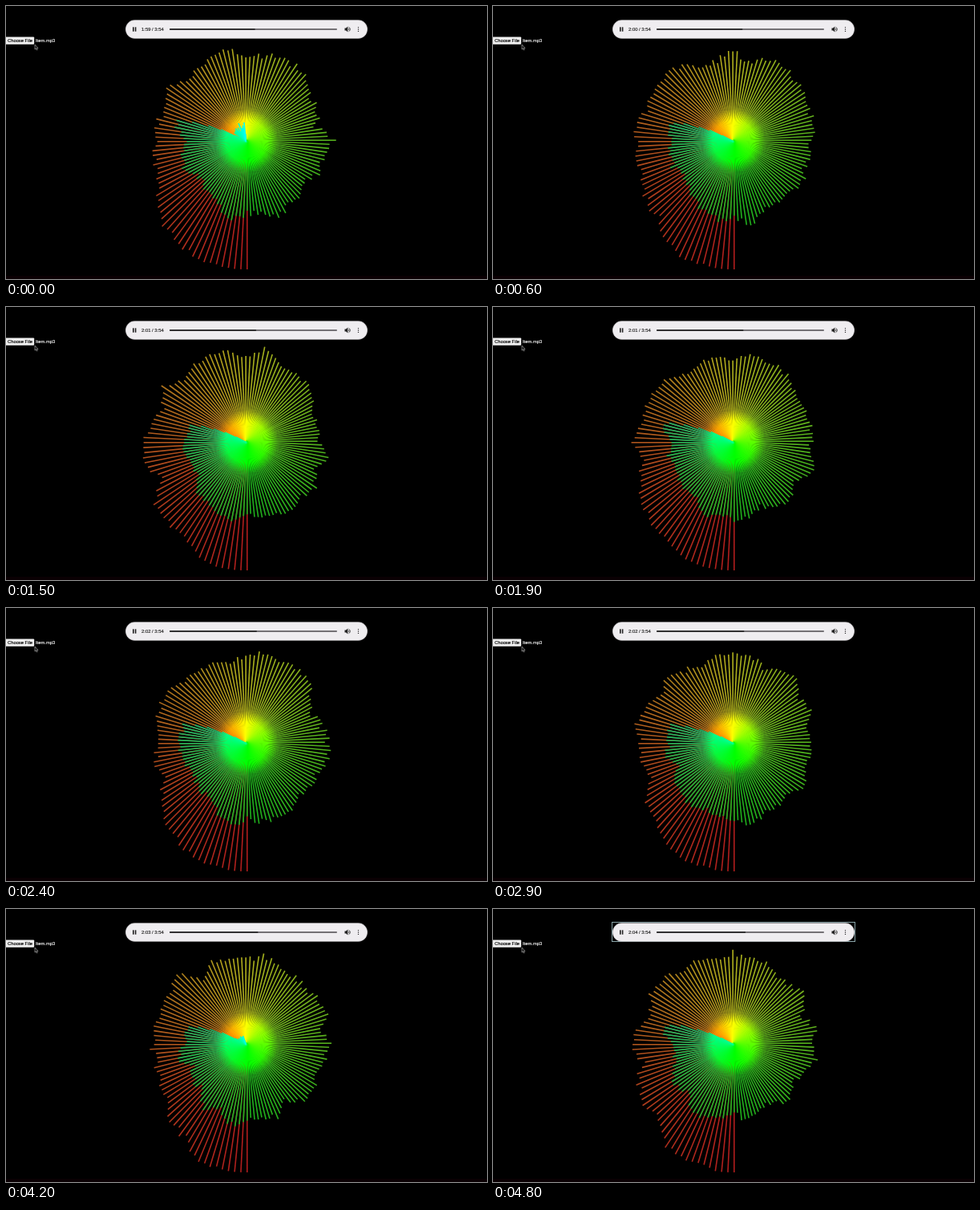
These frames come from a looping animation (600 by 340 pixels, 4.9 s). An HTML page with a canvas:

```html
<!DOCTYPE html>
<html lang="en">
<head>
<meta charset="utf-8">
<title>Radial audio visualizer</title>
<style>
  html, body { margin: 0; width: 100%; height: 100%; overflow: hidden; background: #000; }
  canvas { position: absolute; left: 0; top: 0; width: 600px; height: 340px; }
  span {
    position: absolute; white-space: pre; line-height: 8px;
    font-family: "Liberation Sans", Arial, sans-serif; font-size: 5.8px; color: #000;
    -webkit-text-stroke: 0.15px currentColor;
  }
  #pick { left: 2px; top: 39px; }
  #file { left: 37px; top: 39px; color: #f4f4f4; }
  #time { left: 169px; top: 25px; font-size: 5.9px; color: #222; }
</style>
</head>
<body>
<canvas id="stage" width="600" height="340"></canvas>
<span id="pick">Choose File</span>
<span id="file">Item.mp3</span>
<span id="time"></span>
<script>
const ctx = document.getElementById("stage").getContext("2d");
const timeLabel = document.getElementById("time");

const LOOP = 4900, STEP = 100;
const CX = 300, CY = 168, MAX = 160;
const PER_TURN = 128, BARS = 200, BAR_W = 1.6;
const CUTOFF = 166, TOTAL = 234, START = 119.6;

// Average spectrum as [bar, length], bass first.
const curve = [[0, 164], [8, 156], [24, 121], [40, 119], [52, 108], [72, 108],
               [88, 99], [132, 95], [152, 81], [BARS, 81]];
// Treble hits as [time, height].
const hits = [[0, 22], [3600, 34], [4200, 12]];

const mix = (a, b, u) => a + (b - a) * u;
const clamp = (v, lo, hi) => Math.max(lo, Math.min(hi, v));

function rand(a, b) {
  const s = Math.sin(a * 127.1 + b * 311.7) * 43758.5453;
  return s - Math.floor(s);
}

// Smooth noise over bars and time, -1..1.
function noise(x, y) {
  const i = Math.floor(x), j = Math.floor(y), u = x - i, v = y - j;
  const row = k => mix(rand(i, k), rand(i + 1, k), u);
  return 2 * mix(row(j), row(j + 1), v) - 1;
}

function average(i) {
  const n = curve.findIndex(p => p[0] > i);
  const [x0, y0] = curve[n - 1], [x1, y1] = curve[n];
  return mix(y0, y1, (i - x0) / (x1 - x0));
}

function treble(t, i) {
  const hit = hits.find(([at]) => t >= at && t < at + 300);
  if (!hit) return 0;
  const [at, height] = hit;
  if (i < 173 || i > 178 + height * 0.6) return 0;
  return height * (1 - (t - at) / 300) * (0.3 + 0.8 * rand(i, at));
}

function barLength(t, i) {
  if (i > CUTOFF + 5) return treble(t, i);
  const sway = 11 * noise(i / 4, t / 250) + 4 * noise(i, t / 200 + 60);
  const fade = clamp(1 - (i - CUTOFF) / 5, 0, 1);
  return Math.min(MAX, (average(i) + sway * Math.min(1, i / 12)) * fade);
}

function box(x, y, w, h, color) {
  ctx.fillStyle = color;
  ctx.fillRect(x, y, w, h);
}

function pill(x, y, w, h, r, color) {
  ctx.fillStyle = color;
  ctx.beginPath();
  ctx.roundRect(x, y, w, h, r);
  ctx.fill();
}

function shape(points, color) {
  ctx.fillStyle = color;
  ctx.beginPath();
  points.forEach(([x, y]) => ctx.lineTo(x, y));
  ctx.closePath();
  ctx.fill();
}

// Each bar glows near the hub and is dimmer further out.
function barPaint(i) {
  const hue = i * 0.94 - 7 * Math.sin(2 * Math.PI * i / PER_TURN);
  const paint = ctx.createLinearGradient(0, 0, 0, 40);
  paint.addColorStop(0, `hsl(${hue}, 100%, 50%)`);
  paint.addColorStop(0.65, `hsl(${hue}, 100%, 50%)`);
  paint.addColorStop(1, `hsl(${hue}, 72%, 40%)`);
  return paint;
}

function drawBars(t) {
  for (let i = 0; i < BARS; i++) {
    const len = barLength(t, i);
    if (len < 1) continue;
    ctx.save();
    ctx.translate(CX, CY);
    ctx.rotate(i * 2 * Math.PI / PER_TURN);
    box(0, 0, BAR_W, len, barPaint(i));
    ctx.restore();
  }
}

function drawPlayer(t) {
  if (t >= LOOP - STEP) {
    ctx.strokeStyle = "#8aa4a8";
    ctx.lineWidth = 1;
    ctx.strokeRect(148.5, 16.5, 303, 24);
  }
  pill(149, 17.3, 302, 23.4, 11.7, "#b4b2b5");
  pill(149.6, 17.9, 300.8, 22.2, 11.1, "#efedf0");
  box(158, 26.3, 1.6, 5.4, "#222");
  box(160.8, 26.3, 1.6, 5.4, "#222");

  pill(204, 28.2, 209, 1.5, 0.7, "#4c4a4d");
  pill(204, 28.2, 209 * (START + t / 1000) / TOTAL, 1.5, 0.7, "#1c1c1c");

  shape([[422.5, 27.6], [424.2, 27.6], [426.3, 25.6], [426.3, 32.4], [424.2, 30.4], [422.5, 30.4]], "#222");
  ctx.strokeStyle = "#222";
  ctx.lineWidth = 0.8;
  for (const r of [1.3, 2.8]) {
    ctx.beginPath();
    ctx.arc(426.5, 29, r, -1.2, 1.2);
    ctx.stroke();
  }
  for (const y of [26.6, 29, 31.4]) pill(438.8, y - 0.7, 1.4, 1.4, 0.7, "#222");

  const s = Math.floor(START + t / 1000);
  timeLabel.textContent = `${Math.floor(s / 60)}:${String(s % 60).padStart(2, "0")} / 3:54`;
}

function drawPicker() {
  pill(-1, 38.5, 36.2, 9.2, 1, "#efefef");
  shape([[36, 48], [36, 54], [37.4, 52.8], [38.3, 54.8], [39.2, 54.4], [38.4, 52.5], [40, 52.4]], "#111");
  ctx.strokeStyle = "#bbb";
  ctx.lineWidth = 0.6;
  ctx.stroke();
}

let shown = -1;
function frame() {
  const t = Math.floor(performance.now() % LOOP / STEP) * STEP;
  if (t !== shown) {
    shown = t;
    box(0, 0, 600, 340, "#000");
    box(0, 336, 600, 4, "#0a0003");
    drawBars(t);
    drawPlayer(t);
    drawPicker();
  }
  requestAnimationFrame(frame);
}
frame();
</script>
</body>
</html>
```
